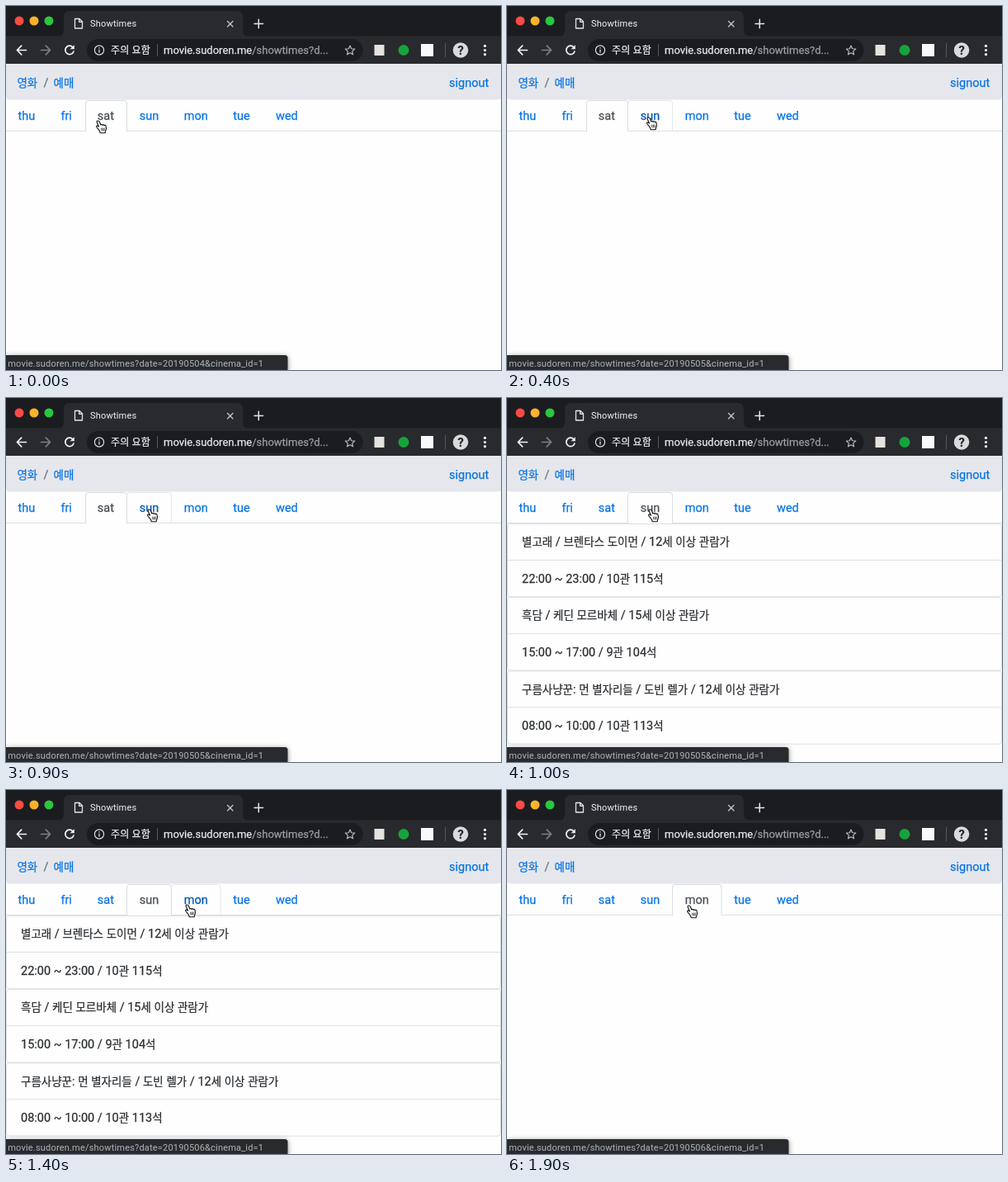
Recreate the animation shown at these times as an HTML page. Size 600 by 441 pixels, loop 2 s.

```html
<!DOCTYPE html>
<html lang="ko">
<head>
<meta charset="utf-8">
<title>Showtimes</title>
<style>
  html, body { margin: 0; width: 100%; height: 100%; overflow: hidden; background: #fefefe; }
  svg { display: block; width: 100vw; height: 100vh; }
  /* a hairline stroke gives the text its slightly heavy smoothing */
  text, tspan { fill: currentColor; stroke: currentColor; }
  text {
    font: 14.5px Roboto, "Noto Sans CJK KR", "Noto Sans CJK", sans-serif;
    white-space: pre; stroke-width: .25px;
  }
  .ko { font-family: "Noto Sans CJK KR", "Noto Sans CJK", sans-serif; font-size: .931em; }
  .link { color: #0875e5; }
  .link.hover { color: #0056b3; }
  .link.active { color: #495057; }
  .body { color: #2b2f33; }
  .small { font-size: 11px; letter-spacing: .19px; stroke-width: .08px; }
  .bar { font-size: 13px; color: #e8eaed; }
  .line { fill: none; stroke-linecap: round; stroke-linejoin: round; }
</style>
</head>
<body>
<svg viewBox="0 0 600 441">
  <defs>
    <filter id="blur" x="-10%" y="-60%" width="120%" height="220%"><feGaussianBlur stdDeviation="3"/></filter>
  </defs>
  <rect width="600" height="441" fill="#fefefe"/>

  <!-- tab strip -->
  <rect width="600" height="37" fill="#1b1c20"/>
  <circle cx="16" cy="18" r="5.5" fill="#fc4a44"/>
  <circle cx="34" cy="18" r="5.5" fill="#fdb42c"/>
  <circle cx="52" cy="18" r="5.5" fill="#29c73f"/>
  <path d="M62 37Q70 37 70 29V14Q70 6 78 6H279Q287 6 287 14V29Q287 37 295 37Z" fill="#282a2e"/>
  <g class="line" stroke="#e4e5e7" stroke-width="1.3">
    <path d="M83.5 15.5H89L92.500 19V27H83.500ZM88.700 15.700V19.300H92.300"/>
    <path d="M268.500 18.500L275 25M275 18.500L268.500 25" stroke="#c3c5c8"/>
    <path d="M301 21.500H311.500M306.250 16.250V26.750" stroke-width="1.5"/>
  </g>
  <text class="small" x="102" y="25.3" color="#e6e7e9">Showtimes</text>

  <!-- toolbar -->
  <rect y="36.500" width="600" height="34" fill="#282a2e"/>
  <rect x="98" y="40" width="334.500" height="27" rx="13.500" fill="#1b1c20"/>
  <g class="line" stroke="#f1f2f3" stroke-width="1.7">
    <path d="M24.500 53.500H13.500M18.700 48.200L13.400 53.500L18.700 58.800"/>
    <path d="M42.500 53.500H53.500M48.300 48.200L53.600 53.500L48.300 58.800" stroke="#7c7f83"/>
    <path d="M81 50A5.200 5.200 0 1 0 82 55"/>
  </g>
  <path d="M82.800 47.200V52.300H77.700Z" fill="#f1f2f3"/>
  <circle cx="113" cy="53.500" r="5.600" fill="none" stroke="#dfe1e4" stroke-width="1.2"/>
  <path d="M113 52.800V56.600M113 50.200V51.500" stroke="#dfe1e4" stroke-width="1.3"/>
  <text class="bar" x="127" y="57.500" data-ko>주의 요함</text>
  <path d="M183.500 46V61M532.500 45V62" stroke="#54575c"/>
  <text class="bar" x="191" y="57.500">movie.sudoren.me<tspan color="#9aa0a6">/showtimes?d...</tspan></text>
  <path id="star" class="line" stroke="#b6b9bd" stroke-width="1.2"/>
  <rect x="446.500" y="47" width="12" height="13" fill="#e6e2dd"/>
  <circle cx="482" cy="53.500" r="6.500" fill="#17a33b"/>
  <rect x="503" y="46" width="15" height="15" fill="#f7f9fc"/>
  <circle cx="551" cy="53.500" r="9.300" fill="#d9dadb"/>
  <text x="551" y="58.800" text-anchor="middle" color="#25272a" font-weight="700" style="font-weight:700">?</text>
  <g fill="#f1f2f3"><circle cx="580.500" cy="48.300" r="1.600"/><circle cx="580.500" cy="53.500" r="1.600"/><circle cx="580.500" cy="58.700" r="1.600"/></g>

  <!-- breadcrumb -->
  <path d="M0 70H600V110Q600 113.500 596.500 113.500H3.500Q0 113.500 0 110Z" fill="#e6e7ec"/>
  <text class="link" x="13.400" y="97.700" data-ko>영화</text>
  <text x="45.500" y="97.500" color="#6c757d">/</text>
  <text class="link" x="57.500" y="97.700" data-ko>예매</text>
  <text class="link" x="537" y="97.500">signout</text>

  <path d="M0 151.500H600" stroke="#dcdfe4"/>
  <g id="cards"></g>
  <path id="hoverBox" fill="#fefefe" stroke="#e6e9ed"/>
  <path id="activeBox" fill="#fefefe" stroke="#d9dde2"/>
  <g id="tabs"></g>

  <!-- status bubble -->
  <rect y="424" width="342" height="24" rx="4" fill="#000" opacity=".4" filter="url(#blur)"/>
  <path d="M0 423H338Q341.500 423 341.500 426.500V441H0Z" fill="#282a2d"/>
  <text id="status" class="small" x="2.200" y="436.500" color="#a9acb0"></text>

  <g id="hand" class="line" stroke="#111" stroke-width="1.1">
    <path fill="#fff" d="M2.600 1C1 .9 .8 2.300 1.400 3.400L3.600 8.200C2.400 7 .6 6.600 .6 8C.7 9.100 2.400 10.200 3.400 11.800C4.200 13.200 5 13.600 5.200 15.700H11.200C11.200 13.800 12.400 12.600 12.500 10.500L12 7.400C11.800 6 10.400 6 10.200 7C10 5.600 8.200 5.400 8 6.600C7.600 5.200 6 5.200 5.800 6L4.300 2.200C3.900 1.300 3.400 1 2.600 1Z"/>
    <path stroke-width=".8" d="M6.600 10.200L6.900 13M8.400 10.100L8.600 13M10.200 10L10.200 13"/>
  </g>
</svg>
<script>
const $ = id => document.getElementById(id);
const LOOP = 2000, STEP = 100;

const withKo = s => s.replace(/[가-힣]+/g, m => `<tspan class="ko">${m}</tspan>`);
document.querySelectorAll('[data-ko]').forEach(el => { el.innerHTML = withKo(el.textContent); });

$('star').setAttribute('d', 'M' + Array.from({ length: 10 }, (_, i) => {
  const a = i * Math.PI / 5, r = i % 2 ? 2.8 : 6;
  return `${417 + r * Math.sin(a)} ${54 - r * Math.cos(a)}`;
}).join('L') + 'Z');

// label, text x, box left, box right, date
const tabs = [
  ['thu', 14.6], ['fri', 66.4],
  ['sat', 110.8, 96.5, 146.5, '20190504'],
  ['sun', 161.8, 146.5, 200.5, '20190505'],
  ['mon', 215.8, 200.5, 260, '20190506'],
  ['tue', 275.3], ['wed', 327]
];
const SAT = 2, SUN = 3, MON = 4;
$('tabs').innerHTML = tabs.map(([label, x]) => `<text class="link" x="${x}" y="138">${label}</text>`).join('');
const labels = [...$('tabs').children];

const movies = [
  ['별고래 / 브렌타스 도이먼 / 12세 이상 관람가', '22:00 ~ 23:00 / 10관 115석'],
  ['흑담 / 케딘 모르바체 / 15세 이상 관람가', '15:00 ~ 17:00 / 9관 104석'],
  ['구름사냥꾼: 먼 별자리들 / 도빈 렐가 / 12세 이상 관람가', '08:00 ~ 10:00 / 10관 113석']
];
$('cards').innerHTML = movies.map(([title, time], i) => `
  <g transform="translate(0 ${152 + i * 89.2})">
    <rect x=".5" y=".5" width="599" height="88.300" rx="3.500" fill="#fefefe" stroke="#dadcdf" stroke-width=".9"/>
    <path d="M.5 44.500H599.500" stroke="#dadcdf" stroke-width=".9"/>
    <text class="body" x="18" y="27.200">${withKo(title)}</text>
    <text class="body" x="18" y="72">${withKo(time)}</text>
  </g>`).join('');

// time, x, y
const moves = [
  [0, 109, 138], [400, 169, 134], [900, 171, 134],
  [1000, 171, 134], [1400, 217, 138], [1800, 218, 139], [LOOP, 218, 139]
];

function handAt(t) {
  const i = moves.findIndex(m => m[0] > t);
  const [t0, x0, y0] = moves[i - 1], [t1, x1, y1] = moves[i];
  const p = (t - t0) / (t1 - t0), e = p * p * (3 - 2 * p);
  return [x0 + (x1 - x0) * e, y0 + (y1 - y0) * e];
}

function tabBox(i, bottom) {
  const [, , l, r] = tabs[i];
  return `M${l} ${bottom}V118Q${l} 114.500 ${l + 3.5} 114.500H${r - 3.5}Q${r} 114.500 ${r} 118V${bottom}`;
}

function draw(time) {
  const t = Math.floor(time % LOOP / STEP) * STEP;
  const [x, y] = handAt(t);
  const tip = x + 3;
  const hover = tip < 146 ? SAT : tip < 201 ? SUN : MON;
  const active = t < 1000 ? SAT : t < 1900 ? SUN : MON;

  $('hand').setAttribute('transform', `translate(${x} ${y})`);
  $('cards').style.display = active === SUN ? '' : 'none';
  $('activeBox').setAttribute('d', tabBox(active, 152));
  $('hoverBox').setAttribute('d', hover === active ? '' : tabBox(hover, 151));
  labels.forEach((el, i) => {
    el.setAttribute('class', 'link' + (i === active ? ' active' : i === hover ? ' hover' : ''));
  });
  $('status').textContent = `movie.sudoren.me/showtimes?date=${tabs[hover][4]}&cinema_id=1`;
}

const start = performance.now();
function tick() {
  draw(performance.now() - start);
  requestAnimationFrame(tick);
}
tick();
</script>
</body>
</html>
```
